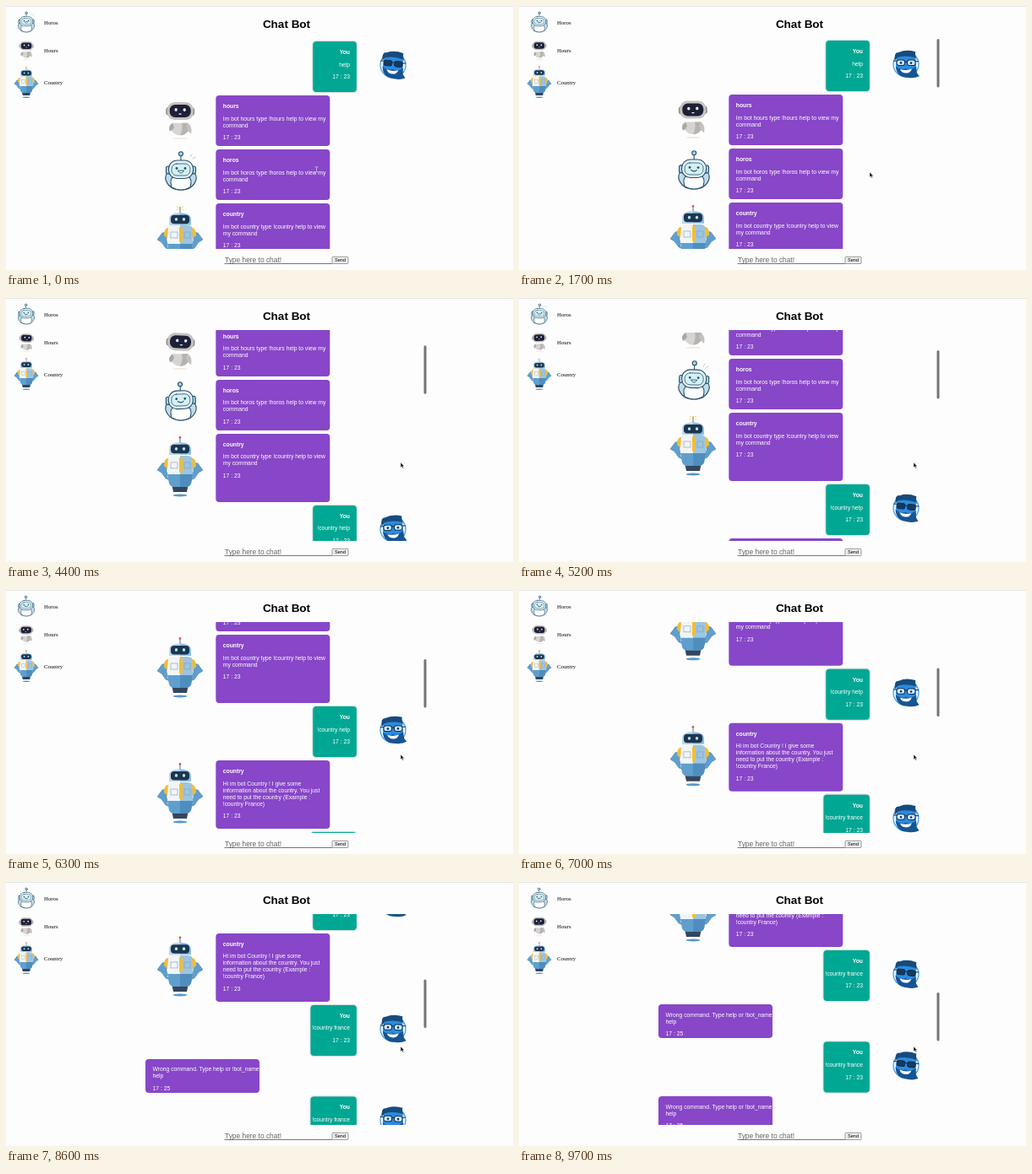
An HTML page for the animation above (9800 ms loop, 600x313 px).

```html
<!DOCTYPE html>
<html lang="en">
<head>
<meta charset="utf-8">
<title>Chat Bot</title>
<style>
  html, body { margin: 0; width: 100%; height: 100%; overflow: hidden; background: #fdfdfd; }
  svg { display: block; width: 600px; height: 313px; }
  text { font: 6.78px "Liberation Sans", Arial, sans-serif; }
  .name { font-weight: bold; }
  .side { font-family: "Liberation Serif", Times, serif; }
  #feed text { fill: #fff; }
  .you text { text-anchor: end; }
  .you rect { filter: drop-shadow(0 0 1px rgba(0, 60, 60, .45)); }
</style>
</head>
<body>
<svg viewBox="0 0 600 313">
  <defs>
    <clipPath id="view"><rect x="150" y="38" width="360" height="250"/></clipPath>

    <g id="horos" fill="#e3f2f8" stroke="#24506d" stroke-width="1.1" stroke-linecap="round">
      <path d="M-15 26Q-19 31-18 36Q-14 48 0 48T18 36Q19 31 15 26Z" fill="#c3dce8"/>
      <path d="M-11 45Q-14 34-8 32H8Q14 34 11 45Q0 51-11 45Z" fill="#fbfdfe"/>
      <g id="horosHead">
        <path d="M0 8V13"/>
        <circle cy="5.300" r="2.500" fill="#a9d4e6"/>
        <rect x="-17.500" y="20" width="4" height="9" rx="2" fill="#a9d4e6"/>
        <rect x="13.500" y="20" width="4" height="9" rx="2" fill="#a9d4e6"/>
        <rect x="-14.500" y="13" width="29" height="21.500" rx="10"/>
        <rect x="-11" y="17" width="22" height="14" rx="6" fill="#d5f0f3" stroke-width=".8"/>
        <g fill="#24506d" stroke="none">
          <circle cx="-5" cy="22.500" r="1.400"/><circle cx="5" cy="22.500" r="1.400"/>
        </g>
        <path id="horosMouth" stroke-width=".9" fill="#fff"/>
      </g>
      <path id="signal" d="M11 9L13 6M14 11L17 9" stroke="#8fc5dc" stroke-width=".8"/>
    </g>

    <g id="hours">
      <ellipse cy="51" rx="9" ry="1" fill="#f3e9e4"/>
      <g id="hoursBody">
        <path d="M-9 33H9Q13 37 10 42Q6 47.500 0 47.500T-10 42Q-13 37-9 33Z" fill="#d6d4d2"/>
        <path d="M2 33H9Q13 37 10 42Q6 47.500 0 47.500Q4 40 2 33Z" fill="#b5b2af"/>
        <path d="M-9 33Q-15 37-12 43Q-9 42-7 38Z" fill="#aaa7a4"/>
        <path d="M9 33Q15 37 13 46Q9 43 7 38Z" fill="#c4c1be"/>
      </g>
      <g id="hoursHead">
        <rect x="-17" y="14" width="34" height="10" rx="4" fill="#8e8a88"/>
        <rect x="-15.500" y="8" width="31" height="21" rx="9" fill="#c6c2be"/>
        <rect x="-12.500" y="11" width="25" height="15" rx="6.500" fill="#1d2036"/>
        <g id="hoursFace" fill="#e6f1ff">
          <ellipse id="hoursEyeL" cx="-5" cy="17" rx="1.700"/>
          <ellipse id="hoursEyeR" cx="5" cy="17" rx="1.700"/>
          <path d="M-2 21.500H2Q0 24.500-2 21.500Z"/>
        </g>
      </g>
    </g>

    <g id="country">
      <ellipse cy="73" rx="8.500" ry="1.500" fill="#5598cb"/>
      <g fill="#5f9fce" stroke="#3d749f" stroke-width=".5">
        <path d="M-16 34L-21 35L-27 43L-22 46L-17 53L-12 55L-11 50L-16 45Z"/>
        <path d="M16 34L21 35L27 43L22 46L17 53L12 55L11 50L16 45Z"/>
      </g>
      <path d="M-10 59H10L8 69H-8Z" fill="#34465c"/>
      <path d="M-15 30Q-14 26-8 26H0V52H-15Z" fill="#f1f5f7"/>
      <path d="M0 26H8Q14 26 15 30V52H0Z" fill="#9cc5e2"/>
      <path d="M-15 48H15L13 59Q11 63 7 63H-7Q-11 63-13 59Z" fill="#5f9fce"/>
      <path d="M0 48H15L13 59Q11 63 7 63H0Z" fill="#4f8dbd"/>
      <path d="M-14 29Q-19 29-19 38L-15 42ZM14 29Q19 29 19 38L15 42Z" fill="#f2bd36"/>
      <rect x="-1" y="28" width="4" height="18" rx="1" fill="#f2bd36"/>
      <g fill="none" stroke="#7d9db5" stroke-width=".6">
        <rect x="-11" y="34" width="8" height="7"/><rect x="5" y="34" width="7" height="7"/>
      </g>
      <g id="countryHead">
        <path d="M0 6V12" stroke="#58708a"/>
        <circle id="lamp" cy="5.500" r="1.300"/>
        <path id="sparks" d="M-4 4L-2.500 4.800M4 4L2.500 4.800M-2.500 7L-4 8M2.500 7L4 8" stroke="#ddb33a" stroke-width=".8"/>
        <path d="M-13 26V18Q-12 11.500 0 11.500T13 18V26Z" fill="#8bbfe2"/>
        <path d="M-13 26V18Q-12 11.500 0 11.500V26Z" fill="#b9d9ee"/>
        <rect x="-11" y="14" width="22" height="10.500" rx="4" fill="#20344d"/>
        <g fill="#a6ecfb">
          <ellipse id="countryEyeL" cx="-4.500" cy="19" rx="1.700"/>
          <ellipse id="countryEyeR" cx="4.500" cy="19" rx="1.700"/>
        </g>
      </g>
    </g>

    <g id="user">
      <circle r="15" fill="#eaf5fd" stroke="#3b9ae6" stroke-width="1.200"/>
      <g id="userHead">
        <path d="M-11-10Q0-16 11-10L12 3Q11 14 2 15Q-9 15-12 4Z" fill="#2b8be0"/>
        <path d="M-13-4Q-15-14-9-14Q0-18 11-15Q10-12 13-5L11-8Q0-11-10-8Z" fill="#174b7c"/>
        <path d="M-12 3Q-6 8 0 5Q6 8 12 2L13 10L16 14Q10 17 3 16Q-11 16-12 3Z" fill="#175492"/>
        <path d="M-7 6Q0 8 7 5.500Q5 11 0 10.500Q-5 10.500-7 6Z" fill="#fff"/>
        <g id="lenses" stroke="#0e2e50" stroke-width="1">
          <rect x="-11" y="-5" width="9.500" height="6.500" rx="2.500"/>
          <rect x="1.500" y="-5" width="9.500" height="6.500" rx="2.500"/>
          <path d="M-15-3.500H-11M-2-3H2M11-3.500H15"/>
        </g>
        <g id="pupils" fill="#0e2e50"><circle cx="-6" cy="-1.500" r="1.300"/><circle cx="6" cy="-1.500" r="1.300"/></g>
      </g>
    </g>
  </defs>

  <rect width="600" height="313" fill="#fdfdfd"/>
  <rect width="600" height="1" fill="#e6e6e6"/>
  <use href="#horos" transform="translate(24 5.500) scale(.53)"/>
  <use href="#hours" transform="translate(24 38) scale(.5)"/>
  <use href="#country" transform="translate(24 69.500) scale(.53)"/>
  <text class="side" x="45" y="22.300">Horos</text>
  <text class="side" x="45" y="55.300">Hours</text>
  <text class="side" x="45" y="93.300">Country</text>
  <text class="name" x="332" y="25.500" text-anchor="middle" style="font-size:13.500px">Chat Bot</text>

  <g clip-path="url(#view)"><g id="feed"></g></g>
  <rect id="thumb" x="494.500" width="3" height="57.500" rx="1.500" fill="#757577"/>

  <text x="259" y="303.500" fill="#666" style="font-size:8.400px">Type here to chat!</text>
  <path d="M258.500 305.500H386" stroke="#555" stroke-width=".8"/>
  <rect x="386" y="297.300" width="19" height="8.200" rx="1" fill="#efefef" stroke="#777" stroke-width=".7"/>
  <text x="395.500" y="303.400" text-anchor="middle" style="font-size:5.600px">Send</text>

  <path id="beam" d="M365.500 190.500Q367.500 190.500 367.500 192V195.500Q367.500 197 365.500 197M369.500 190.500Q367.500 190.500 367.500 192M367.500 195.500Q367.500 197 369.500 197" fill="none" stroke="#c9c9c9" stroke-width=".8"/>
  <path id="arrow" d="M0 0V6L1.400 4.800L2.400 7L3.400 6.500L2.400 4.400H4.300Z" fill="#111" stroke="#fff" stroke-width=".4"/>
</svg>
<script>
const LOOP = 9800, STEP = 100;
const $ = id => document.getElementById(id);
const set = (id, attrs) => Object.entries(attrs).forEach(([k, v]) => $(id).setAttribute(k, v));
const show = (id, on) => set(id, { visibility: on ? 'visible' : 'hidden' });

// who, top, height, lines, time
const intro = (bot, wrap) => [`Im bot ${bot} type !${bot} help to view` + (wrap ? '' : ' my'), (wrap ? 'my ' : '') + 'command'];
const wrong = ['Wrong command. Type help or !bot_name', 'help'];
const messages = [
  ['You', 42, 60, ['help']],
  ['hours', 106, 60, intro('hours')],
  ['horos', 170, 60, intro('horos')],
  ['country', 234, 81, intro('country', true)],
  ['You', 319, 60, ['!country help']],
  ['country', 383, 81, ['Hi im bot Country ! I give some', 'information about the country. You just',
    'need to put the country (Example :', '!country France)']],
  ['You', 468, 60, ['!country france']],
  ['', 532, 40, wrong, '17 : 25'],
  ['You', 576.5, 60, ['!country france']],
  ['', 641, 40, wrong, '17 : 25']
];

function bubble([who, top, height, lines, time = '17 : 23']) {
  const you = who === 'You';
  const x = you ? (lines[0].endsWith('france') ? 360.5 : 363.3) : who ? 248.3 : 165;
  const width = you ? 414.8 - x : 135;
  const textX = you ? 407 : x + 8.5;
  const first = who ? 29.5 : 14.5;
  const put = (s, y, cls = '') => `<text class="${cls}" x="${textX}" y="${y}">${s}</text>`;
  const face = you ? '<use href="#user" x="458" y="28"/>'
    : who ? `<use href="#${who}" x="${who === 'horos' ? 207 : 206}"/>` : '';
  return `<g class="${you ? 'you' : ''}" transform="translate(0 ${top})">
    <rect x="${x}" width="${width}" height="${height}" rx="4" fill="${you ? '#00a793' : '#8846c8'}"/>
    ${who && put(who, 14.9, 'name')}
    ${lines.map((s, i) => put(s, first + 8 * i)).join('')}
    ${put(time, first + 8 * (lines.length - 1) + 14.5)}${face}</g>`;
}
$('feed').innerHTML = messages.map(bubble).join('');

// Linear interpolation through [time, ...values]
function along(keys, t) {
  const i = keys.findIndex(k => k[0] > t);
  if (i < 0) return keys.at(-1).slice(1);
  const a = keys[i - 1], b = keys[i], p = (t - a[0]) / (b[0] - a[0]);
  return a.slice(1).map((v, n) => v + (b[n + 1] - v) * p);
}
const scrollKeys = [[0, 0], [1500, 0], [1700, 1], [2300, 10], [3500, 45], [5200, 98],
  [6300, 181], [7600, 263], [9700, 387], [9800, 391]];
const mouseKeys = [[0, 368, 192], [400, 368, 192], [900, 390, 293], [1400, 415, 197], [1700, 415, 197],
  [2300, 490, 198], [2700, 507, 198], [3400, 467, 195], [9800, 467, 195]];

function draw(t) {
  const [scroll] = along(scrollKeys, t), [mx, my] = along(mouseKeys, t);
  const wave = (period, shift = 0) => Math.sin(2 * Math.PI * (t / period + shift));
  set('feed', { transform: `translate(0 ${-scroll})` });
  set('thumb', { y: 38.8 + scroll * .238 });
  show('thumb', t >= 1300);
  show('beam', t < 400);
  show('arrow', t >= 400);
  set('arrow', { transform: `translate(${mx} ${my})` });

  // Horos rests for about a second in each five
  const h = t % 5000, resting = h > 3300 && h < 4400;
  set('horosHead', { transform: `rotate(${resting ? 0 : 2.5 * Math.sin(h / 3300 * 4 * Math.PI)} 0 30)` });
  show('signal', h < 600);
  set('horosMouth', { d: `M-3.500 25.500Q0 ${h < 600 ? 31 : 28.5} 3.500 25.500${h < 600 ? 'Z' : 'Q0 28.500-3.500 25.500'}` });

  set('hoursHead', { transform: `translate(0 ${.6 * wave(2000)}) rotate(${3 * wave(3400, .05)} 0 30)` });
  set('hoursBody', { transform: `translate(0 ${.5 * wave(2000, -.1)})` });
  set('hoursFace', { transform: `translate(${1.2 * wave(3400)} 0)` });
  const blink = t % 2500 > 2300 ? .4 : 1.9;
  for (const eye of ['hoursEyeL', 'hoursEyeR', 'countryEyeL', 'countryEyeR']) set(eye, { ry: blink });

  const lit = t % 2500 > 2400 || t % 2500 < 300;
  set('countryHead', { transform: `translate(0 ${-.6 + .7 * wave(2500, .1)})` });
  set('lamp', { fill: lit ? '#e5b52f' : '#d94d4d' });
  show('sparks', lit);

  const shades = t % 4700 < 1000;
  set('lenses', { fill: shades ? '#16395c' : '#cfeaff' });
  show('pupils', !shades);
  set('userHead', { transform: `rotate(${shades ? 6 : 2 * wave(1600)})` });
}

const start = performance.now();
function tick() {
  const t = (performance.now() - start) % LOOP;
  draw(Math.floor(t / STEP) * STEP);
  requestAnimationFrame(tick);
}
tick();
</script>
</body>
</html>
```
